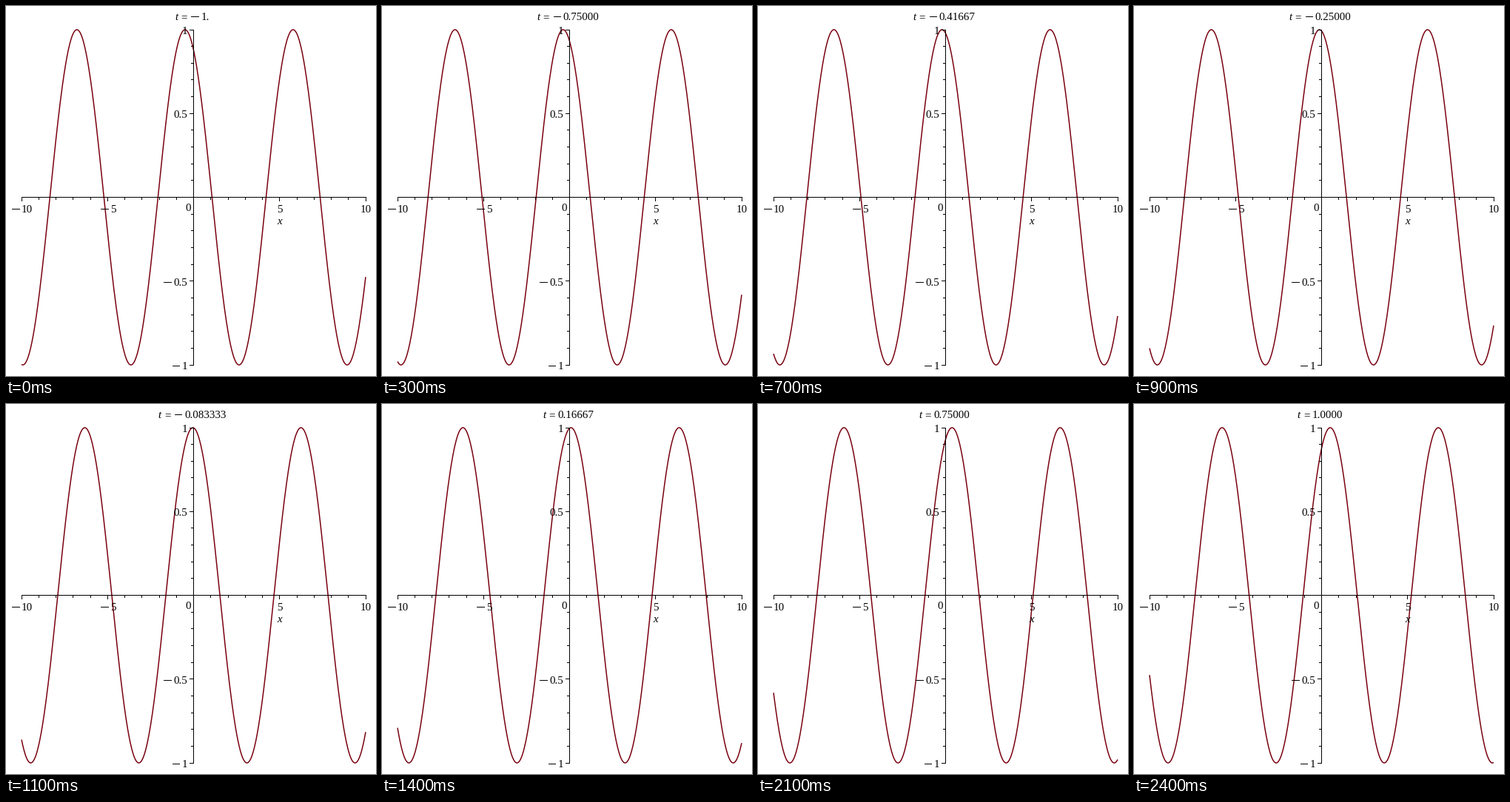
These frames come from a looping animation (500x500 px, 2.5 s). A matplotlib script:

```python
import numpy as np
import matplotlib.pyplot as plt
from matplotlib.animation import FuncAnimation

SIZE, DPI = 500, 100
FRAMES, INTERVAL = 25, 100
CX, CY = 253.5, 258.5          # origin of the plot, px
UX, UY = 23.25, 226.5          # px per unit
EM = 15                        # font size, px
PT = 72 / DPI

plt.rcParams["font.family"] = "Liberation Serif"
fig = plt.figure(figsize=(SIZE / DPI, SIZE / DPI), dpi=DPI, facecolor="white")
ax = fig.add_axes([0, 0, 1, 1])
ax.set_xlim(0, SIZE)
ax.set_ylim(SIZE, 0)
ax.axis("off")


def pixel(values):
    """Move coordinates to the centres of their pixels."""
    return np.floor(values) + 0.5


def stroke(xs, ys):
    return ax.plot(pixel(xs), pixel(ys), color="black", lw=PT, snap=False,
                   solid_capstyle="projecting", zorder=2)[0]


def text(x, y, s, style="normal"):
    return ax.text(x, y, s, size=EM * PT, style=style, color="black",
                   ha="left", va="baseline", zorder=3)


def advance(s):
    return EM * sum({"-": 1, ".": 0.25}.get(c, 0.5) for c in s)


def minus_span(x):
    return np.array([x + 2.5, x + 12])


def label(x, y, s, align):
    x -= align * advance(s)
    if s.startswith("-"):
        stroke(minus_span(x), [y - 4.5] * 2)
        x, s = x + EM, s[1:]
    text(x, y, s)


def draw_axes():
    stroke([CX - 10 * UX, CX + 10 * UX], [CY, CY])
    stroke([CX, CX], [CY - UY, CY + UY])
    for i in range(-10, 11):
        size = 5 if i % 5 == 0 else 3
        x, y = CX + i * UX, CY - i * UY / 10
        stroke([x, x], [CY, CY + size])
        stroke([CX - size, CX], [y, y])
    for v in (-10, -5, 5, 10):
        label(CX + v * UX, 279, str(v), 0.5)
    for v in (-1, -0.5, 0.5, 1):
        label(CX - 8.5, CY - v * UY + 6, f"{v:g}", 1)
    label(CX - 4, 277, "0", 1)
    text(CX + 5 * UX - 0.22 * EM, 295, "x", "italic")


def format_t(k):
    if k in (-12, 0):
        return f"{k // 12}."
    return f"{k / 12:#.5g}"


draw_axes()
xs = np.linspace(-10, 10, 801)
curve, = ax.plot(CX + UX * xs, CY + 0 * xs, color="#78000e", lw=1.5 * PT,
                 solid_capstyle="butt", zorder=1)
name = text(0, 19, "t", "italic")
equals = text(0, 19, "=")
value = text(0, 19, "")
sign = stroke([0, 0], [14.5, 14.5])


def update(frame):
    k = frame - 12
    curve.set_ydata(CY - UY * np.cos(xs - k / 24))

    s = format_t(k)
    lead = 1.34 * EM               # width of "t = "
    left = 251.5 - (lead + advance(s)) / 2
    start = left + lead
    name.set_x(left)
    equals.set_x(left + 0.53 * EM)
    sign.set_visible(k < 0)
    sign.set_xdata(pixel(minus_span(start)))
    value.set_x(start + (EM if k < 0 else 0))
    value.set_text(s.lstrip("-"))
    return curve, name, equals, sign, value


anim = FuncAnimation(fig, update, frames=FRAMES, interval=INTERVAL,
                     repeat=True, repeat_delay=0)
plt.show()
```
